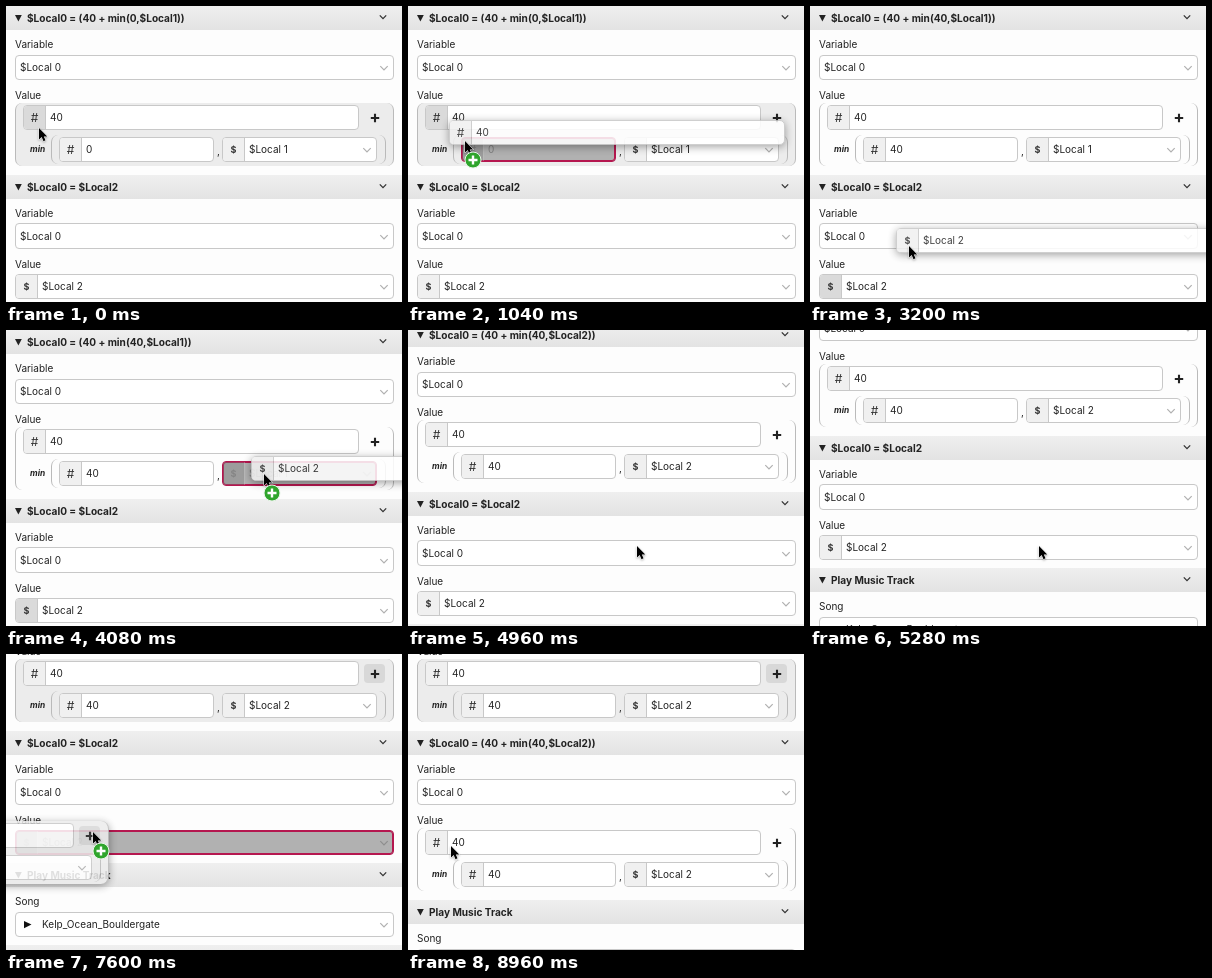
An HTML page that plays this animation: 396x296 px, repeating every 9920 ms.

```html
<!DOCTYPE html>
<html lang="en">
<head>
<meta charset="utf-8">
<title>Script editor</title>
<style>
html, body { margin: 0; width: 100%; height: 100%; overflow: hidden; background: #fdfdfd; }
body { font: 10px Inter, "Liberation Sans", sans-serif; color: #222; }
div { position: absolute; box-sizing: border-box; white-space: pre; }
svg { position: absolute; overflow: visible; }
#stage { left: 0; top: 0; width: 396px; height: 296px; overflow: hidden; }
.section { left: 0; width: 396px; }
.head { background: linear-gradient(#efefef, #e3e3e3); font-size: 10.1px; font-weight: 700; line-height: 24px; }
.label { line-height: 18px; }
.field { line-height: 23px; background: #fff; border: 1px solid #c8c8c8; border-radius: 4px; }
.cell { left: 0; top: 0; width: 22px; height: 100%; text-align: center; background: #f0f0f0;
  border-right: 1px solid #c8c8c8; border-radius: 3px 0 0 3px; color: #333; }
.num { font-size: 12px; }
.var { font-size: 9px; font-weight: 700; }
.cell.hot { background: #dadada; }
.over { background: #b1b1b1; border-color: #b5174f; box-shadow: inset 0 0 0 1px #b5174f; }
.over > div { opacity: .35; }
.over .cell { background: #777; }
.over path { stroke: #8e8e8e; }
.group { width: 379px; height: 63px; }
.group, .inner { border: solid #bababa; border-width: 0 1px; border-radius: 7px; }
.group.hot { background: #ececec; }
.plus { border-radius: 4px; }
.plus.hot { background: #d8d8d8; }
.min { font: italic 700 8.4px Inter, "Liberation Sans", sans-serif; line-height: 18px; }
.ghost { border-radius: 5px; box-shadow: 0 2px 9px rgba(0, 0, 0, .42); }
.ghost.group { border-radius: 8px; }
</style>
</head>
<body>
<div id="stage"></div>
<script>
const LOOP = 9920, TICK = 80;
const stage = document.getElementById('stage');

function add(parent, cls, x, y, w, h, text = '') {
  const e = document.createElement('div');
  e.className = cls;
  e.textContent = text;
  e.style.left = x + 'px';
  e.style.top = y + 'px';
  if (w) e.style.width = w + 'px';
  if (h) e.style.height = h + 'px';
  parent.append(e);
  return e;
}

function icon(parent, x, y, d, attrs) {
  parent.insertAdjacentHTML('beforeend',
    `<svg width="1" height="1" style="left:${x}px;top:${y}px"><path d="${d}" fill="none" ${attrs}/></svg>`);
  return parent.lastElementChild;
}

function field(parent, x, y, w, mark, value, arrow, h = 25) {
  const box = add(parent, 'field', x, y, w, h);
  const cell = mark && add(box, 'cell ' + (mark === '#' ? 'num' : 'var'), 0, 0, 0, 0, mark);
  const text = add(box, '', mark ? 26 : 4, h - 25, 0, 0, value);
  if (arrow) icon(box, w - 11, h - 13, 'M-3.7 -1.9L0 1.9L3.7 -1.9', 'stroke="#b0b0b0" stroke-width="1.2"');
  return { box, cell, text };
}

function group(parent, x, y, arg, name) {
  const box = add(parent, 'group', x, y);
  add(box, 'inner', 35, 32, 335, 29);
  const first = field(box, 7, 2, 336, '#', '40');
  const plus = add(box, 'plus', 348, 5, 21, 19);
  icon(plus, 10.5, 9.5, 'M-4.2 0H4.2M0 -4.2V4.2', 'stroke="#222" stroke-width="2.1"');
  add(box, 'min', 14, 37, 0, 0, 'min');
  const left = field(box, 43, 34, 155, '#', arg);
  add(box, 'label', 201, 39, 0, 0, ',');
  const right = field(box, 206, 34, 155, '$', name, true);
  return { box, first, plus, left, right };
}

function section(title, y) {
  const box = add(scroller, 'section', 0, y);
  const head = add(box, 'head', 0, 0, 396, 24);
  const text = add(head, '', 21, 0, 0, 0, title);
  icon(head, 9, 9, 'M0 0H6.8L3.4 6.4Z', 'style="fill:#222"');
  icon(head, 377, 11, 'M-3.2 -1.6L0 1.6L3.2 -1.6', 'stroke="#333" stroke-width="1.3"');
  return { box, text };
}

const label = (s, y, text) => add(s.box, 'label', 9, y, 0, 0, text);

const scroller = add(stage, '', 0, 0, 396, 600);

const one = section('', 0);
label(one, 29, 'Variable');
field(one.box, 9, 49, 379, '', '$Local 0', true);
label(one, 80, 'Value');
const sum = group(one.box, 9, 97, '0', '$Local 1');

const two = section('', 169);
label(two, 29, 'Variable');
const target = field(two.box, 9, 48, 379, '', '$Local 0', true, 26);
const pencil = icon(target.box, 345, 17.5, 'M0 0L1 -3L7.5 -9.5L9.5 -7.5L3 -1ZM6 -8L8 -6',
  'stroke="#c4c4c4" stroke-width="1"');
label(two, 80, 'Value');
const plain = field(two.box, 9, 99, 379, '$', '$Local 2', true);
const copy = group(two.box, 9, 97, '40', '$Local 2');

const three = section('Play Music Track', 301);
label(three, 29, 'Song');
const song = field(three.box, 9, 49, 379, '', '', true);
icon(song.box, 7.5, 8, 'M0 0L7.5 3.6L0 7.2Z', 'style="fill:#111"');
add(song.box, '', 26, 0, 0, 0, 'Kelp_Ocean_Bouldergate');

const four = section('', 383);

// Dragged pieces: home is the resting place, grab the pointer at pick-up.
const bigGhost = group(stage, 0, 0, '40', '$Local 2');
bigGhost.box.classList.add('hot');
bigGhost.plus.classList.add('hot');
const drags = [
  { start: 720, over: 1040, drop: 1520, home: [17, 99], grab: [33, 120], slot: sum.left.box,
    ghost: field(stage, 0, 0, 336, '#', '40').box },
  { start: 2880, over: 3680, drop: 4160, home: [9, 268], grab: [22, 286], slot: sum.right.box,
    ghost: field(stage, 0, 0, 379, '$', '$Local 2', true).box },
  { start: 7040, over: 7520, drop: 8240, home: [9, 5], grab: [372, 16], slot: plain.box,
    ghost: bigGhost.box }
];
drags.forEach(d => d.ghost.classList.add('ghost'));

const pointer = add(stage, '', 0, 0);
icon(pointer, 0, 0, 'M0 0V11.6L2.7 9.1L4.5 13.2L6.5 12.3L4.8 8.4H8.3Z',
  'style="fill:#000;filter:drop-shadow(0 1px 1px rgba(0,0,0,.3))" stroke="#fff" stroke-width="1" paint-order="stroke"');
const badge = add(pointer, '', 8, 19);
icon(badge, 0, 0, 'M-8 0A8 8 0 1 1 8 0A8 8 0 1 1 -8 0Z', 'style="fill:#2fa52c" stroke="#e9f5e9" stroke-width="1"');
icon(badge, 0, 0, 'M-4.5 0H4.5M0 -4.5V4.5', 'stroke="#fff" stroke-width="2.4"');

const ease = {
  smooth: u => u * u * (3 - 2 * u),
  speedUp: u => u ** 1.5,
  slowDown: u => 1 - (1 - u) ** 1.5
};

// [time, x, y, easing towards this point]
const path = [
  [0, 33, 122], [160, 33, 120], [640, 33, 120], [1280, 68, 142], [1840, 68, 142],
  [2240, 41, 243, 'speedUp'], [2560, 22, 286, 'slowDown'], [2800, 22, 286],
  [3840, 256, 146], [4080, 258, 144], [4320, 258, 144], [4720, 229, 216], [5840, 229, 216],
  [6640, 372, 16], [6960, 372, 16], [7600, 87, 178, 'slowDown'], [8000, 43, 192, 'slowDown'],
  [LOOP, 43, 192]
];
const scroll = [[0, 0], [4880, 0], [5280, 63], [5520, 63], [5760, 92], [LOOP, 92]];

function at(track, t, i) {
  const n = track.findIndex(k => k[0] > t);
  const a = track[n - 1], b = track[n];
  const f = ease[b[3]] || ease.smooth;
  return a[i] + (b[i] - a[i]) * f((t - a[0]) / (b[0] - a[0]));
}

const move = (e, x, y) => { e.style.transform = `translate(${x}px, ${y}px)`; };
const show = (e, on) => { e.style.display = on ? '' : 'none'; };
const hot = (e, on) => e.classList.toggle('hot', on);
const put = (e, text) => { if (e.textContent !== text) e.textContent = text; };

function draw(t) {
  const x = at(path, t, 1), y = at(path, t, 2);
  const [firstDone, secondDone, thirdDone] = drags.map(d => t >= d.drop);
  const arg = firstDone ? '40' : '0';
  const name = secondDone ? '2' : '1';

  move(scroller, 0, -Math.round(at(scroll, t, 1)));
  move(pointer, Math.round(x), Math.round(y));

  put(sum.left.text, arg);
  put(sum.right.text, '$Local ' + name);
  put(one.text, `$Local0 = (40 + min(${arg},$Local${name}))`);
  put(two.text, '$Local0 = ' + (thirdDone ? '(40 + min(40,$Local2))' : '$Local2'));
  show(plain.box, !thirdDone);
  show(copy.box, thirdDone);
  move(three.box, 0, thirdDone ? 37 : 0);
  move(four.box, 0, thirdDone ? 37 : 0);

  hot(sum.box, t < 1920 || t >= 6560);
  hot(sum.first.cell, t < 1920);
  hot(sum.plus, t >= 6560);
  hot(plain.cell, t >= 2480 && t < 4400);
  show(pencil, t >= 2160 && t < 2400);

  let over = false;
  for (const d of drags) {
    const aimed = t >= d.over && t < d.drop;
    over = over || aimed;
    d.slot.classList.toggle('over', aimed);
    show(d.ghost, t >= d.start && t < d.drop + TICK);
    d.ghost.style.opacity = t < d.drop ? .86 : .3;
    move(d.ghost, Math.round(d.home[0] + x - d.grab[0]), Math.round(d.home[1] + y - d.grab[1]));
  }
  show(badge, over);
}

const begin = performance.now();
function frame() {
  const t = Math.max(0, performance.now() - begin) % LOOP;
  draw(Math.floor(t / TICK) * TICK);
  requestAnimationFrame(frame);
}
frame();
</script>
</body>
</html>
```
